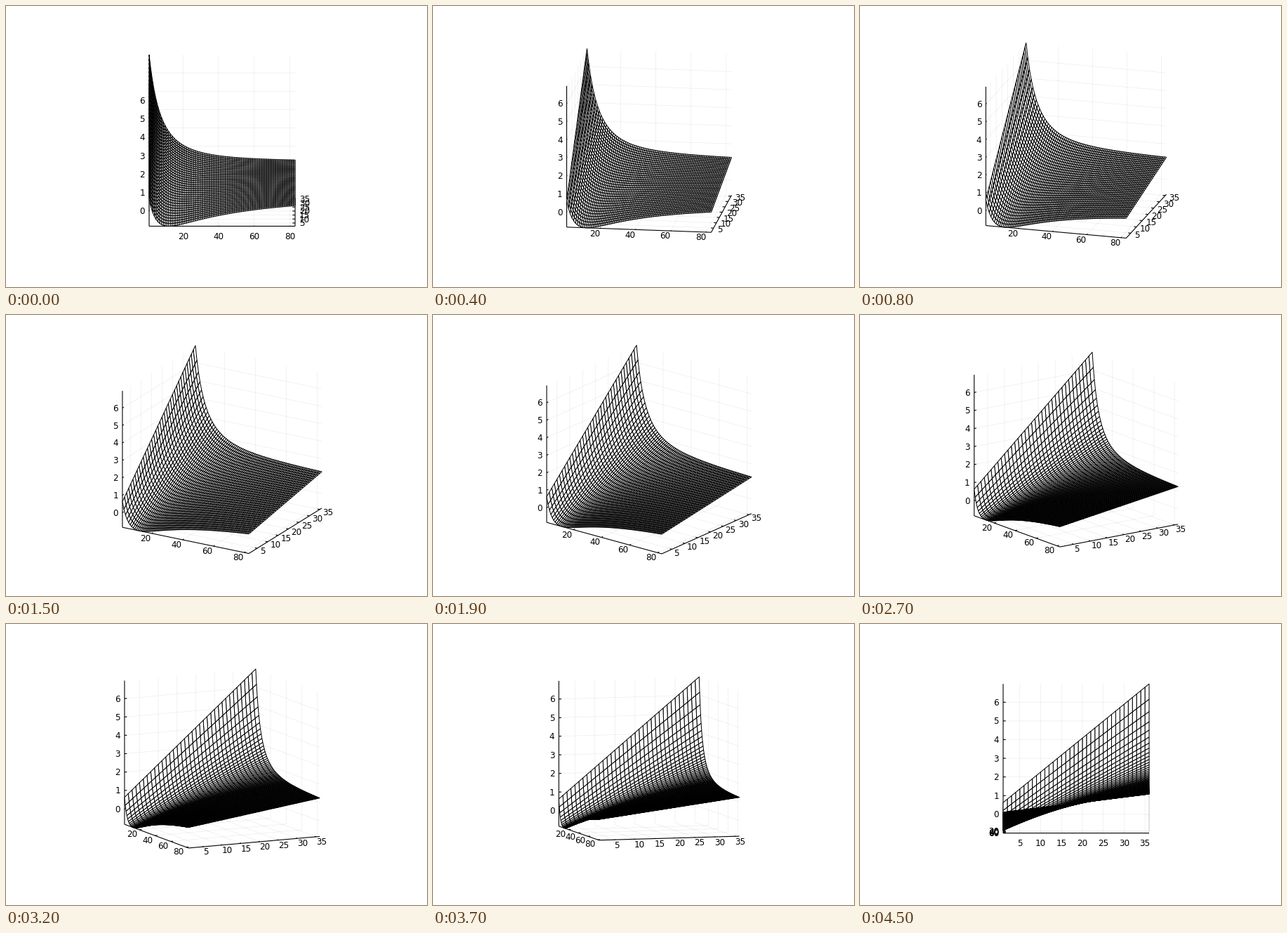
Recreate the animation shown at these times as a matplotlib script. Size 600 by 400 pixels, loop 4550 ms.

```python
import numpy as np
import matplotlib.pyplot as plt
from matplotlib.animation import FuncAnimation
from matplotlib.collections import LineCollection, PolyCollection

W, H, DPI = 600, 400, 100
FRAMES, INTERVAL = 91, 50
CX, CY, HALF = 308.0, 191.5, 104      # stage centre and half cube edge, px
PX = 72 / DPI                         # one pixel in points
LOW = np.array([1, 1, -0.84])
HIGH = np.array([83, 36, 6.98])
TICKS = [range(20, 81, 20), range(5, 36, 5), range(0, 7)]
TICK_LEN = 0.036
FONT_PX = 12


def height(x, y):
    """Valley along x, raised linearly with y."""
    base = -0.84 + 1169.7 * (1 / (x + 12) - 0.04147) ** 2
    slope = 6.35 * 14.8 / (x + 13.8) / 35
    return base + slope * (y - 1)


def unit(value, axis):
    return 2 * (value - LOW[axis]) / (HIGH[axis] - LOW[axis]) - 1


def camera(i):
    return np.radians(i), np.radians(11 + 10 * np.sin(i / 20))


def project(points, i):
    """Orthographic view of cube points (..., 3) in stage pixels."""
    az, el = camera(i)
    x, y, z = np.moveaxis(np.asarray(points, float), -1, 0)
    depth = y * np.cos(az) - x * np.sin(az)
    sx = CX + HALF * (x * np.cos(az) + y * np.sin(az))
    sy = CY - HALF * (z * np.cos(el) + depth * np.sin(el))
    return np.stack([sx, sy], axis=-1)


def build_faces():
    """Quads of the surface, ordered from back to front."""
    x, y = np.meshgrid(np.arange(1, 84), np.arange(36, 0, -1))
    p = np.stack([unit(x, 0), unit(y, 1), unit(height(x, y), 2)], axis=-1)
    quads = np.stack([p[:-1, :-1], p[:-1, 1:], p[1:, 1:], p[1:, :-1]], axis=2)
    return quads.reshape(-1, 4, 3)


def build_lines():
    """Grid lines on floor and back walls, and axes with tick marks."""
    grid = []
    axes = [[(-1, -1, -1), (1, -1, -1)],
            [(1, -1, -1), (1, 1, -1)],
            [(-1, -1, -1), (-1, -1, 1)]]
    for v in TICKS[0]:
        u = unit(v, 0)
        grid += [[(u, -1, -1), (u, 1, -1)], [(u, 1, -1), (u, 1, 1)]]
        axes.append([(u, -1, -1), (u, -1 + TICK_LEN, -1)])
    for v in TICKS[1]:
        u = unit(v, 1)
        grid += [[(1, u, -1), (-1, u, -1)], [(-1, u, -1), (-1, u, 1)]]
        axes.append([(1, u, -1), (1 - TICK_LEN, u, -1)])
    for v in TICKS[2]:
        u = unit(v, 2)
        grid += [[(-1, -1, u), (-1, 1, u)], [(-1, 1, u), (1, 1, u)]]
        axes.append([(-1, -1, u), (-1, -1 + TICK_LEN, u)])
    return np.array(grid), np.array(axes)


def label_style(axis, i):
    """Alignment and pixel offset of the tick labels of one axis."""
    az = np.radians(i)
    s, c = np.sin(az), np.cos(az)
    if axis == 2:
        return 'right', -6, 0
    if axis == 0:
        if i == 0:
            return 'center', 0, 14
        if i == 90:
            return 'right', -6, 0
        return 'right', 0.5 - 4 * s, 5.2 + 1.8 * c
    if i == 0:
        return 'left', 6, 0
    if i == 90:
        return 'center', 0, 14
    return 'left', 6 * c - 3 * s, 0.5 + 7 * s


fig = plt.figure(figsize=(W / DPI, H / DPI), dpi=DPI, facecolor='white')
ax = fig.add_axes([0, 0, 1, 1])
ax.set_xlim(0, W)
ax.set_ylim(H, 0)
ax.axis('off')

faces = build_faces()
grid, axes = build_lines()
grid_art = LineCollection([], colors=[(0, 0, 0, 0.1)], linewidths=0.5 * PX, zorder=1)
axes_art = LineCollection([], colors='black', linewidths=1.1 * PX, zorder=2)
mesh_art = PolyCollection([], facecolors='white', edgecolors='black',
                          linewidths=1.0 * PX, joinstyle='round', zorder=3)
for art in (grid_art, axes_art, mesh_art):
    art.set_snap(False)
    ax.add_collection(art, autolim=False)

labels = []
for axis, anchor in enumerate([(0, -1, -1), (1, 0, -1), (-1, -1, 0)]):
    for v in TICKS[axis]:
        spot = list(anchor)
        spot[axis] = unit(v, axis)
        text = ax.text(0, 0, str(v), family='DejaVu Sans', color='black',
                       fontsize=FONT_PX * PX, va='baseline', zorder=4)
        labels.append((axis, spot, text))


def draw(i):
    grid_art.set_segments(project(grid, i))
    axes_art.set_segments(project(axes, i))
    mesh_art.set_verts(project(faces, i))
    for axis, spot, text in labels:
        align, dx, dy = label_style(axis, i)
        x, y = project(spot, i)
        text.set_ha(align)
        text.set_position((x + dx, y + dy + 0.365 * FONT_PX))
    return []


anim = FuncAnimation(fig, draw, frames=FRAMES, interval=INTERVAL,
                     repeat=True, repeat_delay=0, blit=False)
plt.show()
```
